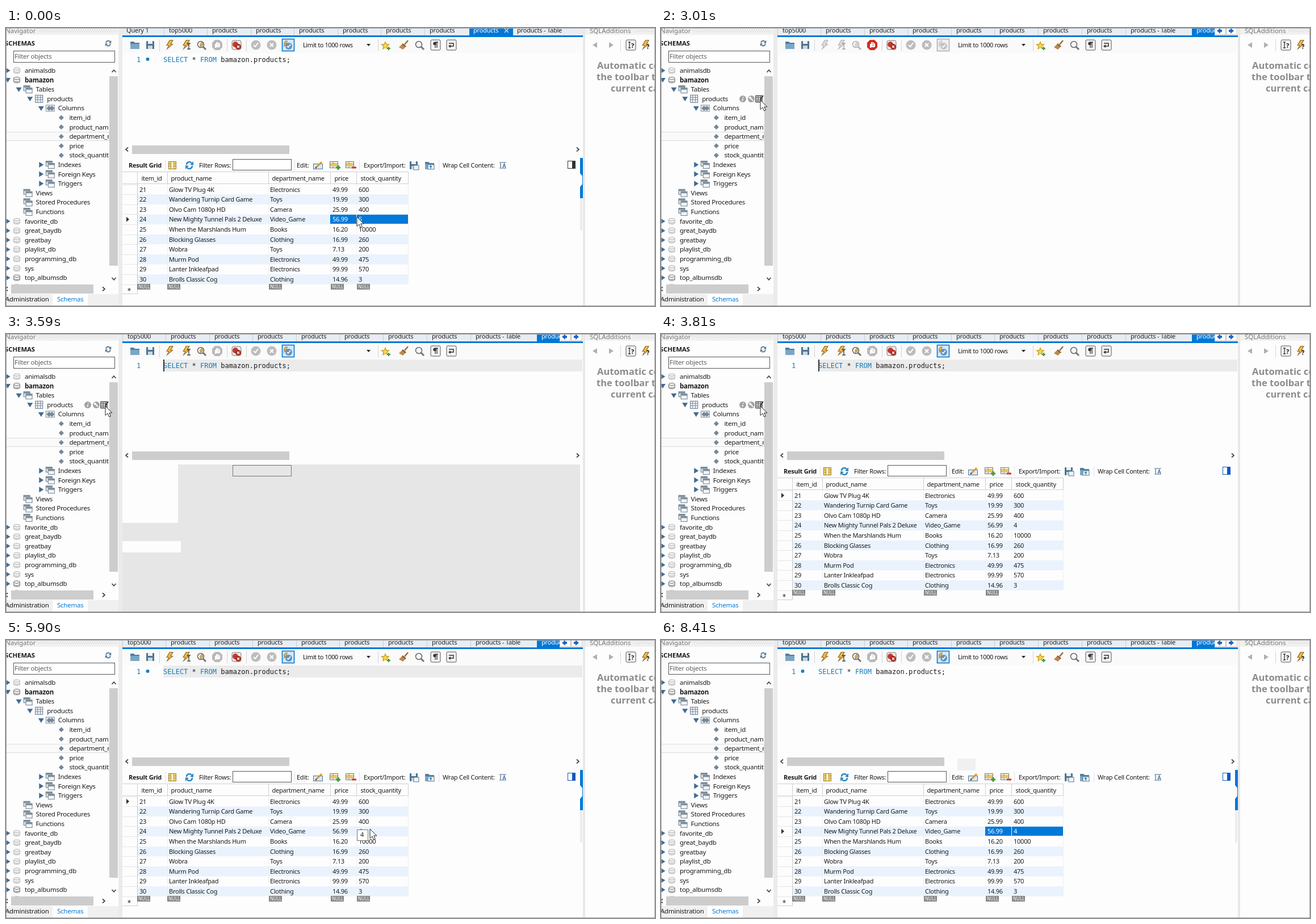
An HTML page for the animation above (9230 ms loop, 1143 by 490 pixels).

```html
<!DOCTYPE html>
<html lang="en">
<head>
<meta charset="utf-8">
<title>Query result refresh</title>
<style>
html, body { margin: 0; width: 100%; height: 100%; overflow: hidden; background: #fdfdfd; }
svg { display: block; width: 1143px; height: 490px; }
text { font: 11px "Noto Sans", "Open Sans", sans-serif; letter-spacing: -.25px; fill: #1a1a1a; white-space: pre; }
.tree { font-size: 11.5px; }
.tab { letter-spacing: -.2px; fill: #222; }
.bold { font-weight: 700; }
.title { font-size: 11.3px; font-weight: 700; letter-spacing: 0; }
.cap { font-size: 11.5px; letter-spacing: 0; fill: #777; }
.limit { letter-spacing: -.4px; }
.code { font: 12px "DejaVu Sans Mono", monospace; letter-spacing: 0; }
.kw { fill: #0f7fc0; }
.white { fill: #fff; }
.link { fill: #0078d7; }
.null { font-size: 8px; letter-spacing: 0; fill: #fff; }
.help { font-size: 16.5px; font-weight: 700; letter-spacing: 0; fill: #8c8c8c; }
.dim { filter: grayscale(1) opacity(.5); }
</style>
</head>
<body>
<svg id="stage" viewBox="0 0 1143 490"></svg>
<script>
const LOOP = 9230;
const BLUE = '#0078d7';

// Drawing helpers; text is placed by its vertical centre.
const text = (x, y, s, cls = '') => `<text x="${x}" y="${y + 4}" class="${cls}">${s}</text>`;
const rect = (x, y, w, h, fill, more = '') => `<rect x="${x}" y="${y}" width="${w}" height="${h}" fill="${fill}" ${more}/>`;
const box = (x, y, w, h, stroke, fill = 'none') => rect(x + .5, y + .5, w - 1, h - 1, fill, `stroke="${stroke}"`);
const path = (d, stroke, w = 1, fill = 'none') => `<path d="${d}" stroke="${stroke}" stroke-width="${w}" fill="${fill}"/>`;
const shape = (d, fill) => `<path d="${d}" fill="${fill}"/>`;
const disc = (x, y, r, fill) => `<circle cx="${x}" cy="${y}" r="${r}" fill="${fill}"/>`;
const at = (x, y, s) => `<g transform="translate(${x} ${y})">${s}</g>`;
const group = (id, s) => `<g id="${id}">${s}</g>`;
const vline = (x, y1, y2, c = '#d4d4d4') => rect(x, y1, 1, y2 - y1, c);
const list = (items, fn) => items.map(fn).join('');

// Small icons, centred on 0,0
const bolt = shape('M0-9H7L3-2H7L-6 9L-2 1H-6Z', '#8b6a35') + shape('M1-8H5L1-1H4L-3 5L0 0H-4Z', '#f8bd3e');
const lens = path('M3 3L8 8', '#777', 3) + `<circle r="5.5" cx="-1" cy="-1" fill="#f4f7fa" stroke="#666" stroke-width="1.5"/>`;
const disk = rect(-7, -7, 14, 14, '#4d7590', 'rx="1"') + rect(-4, -7, 8, 5, '#e9eff3') + rect(-4, 1, 8, 6, '#c7d7e0');
const folder = shape('M-8-6H-2L0-4H8V7H-8Z', '#4f7ea3') + rect(-8, -2, 16, 9, '#7ba6c6');
const button = s => rect(-8, -9, 17, 18, '#f4f4f4', 'rx="2" stroke="#555"') + s;
const refresh = path('M-5-1A5 5 0 0 1 4-4', '#3187c4', 2.5) + shape('M1-1L7-7V0Z', '#3187c4')
  + path('M5 1A5 5 0 0 1-4 4', '#3187c4', 2.5) + shape('M-1 1L-7 7V0Z', '#3187c4');
const gridIcon = (fill, line) => rect(-6.5, -6.5, 13, 13, fill, `stroke="${line}"`)
  + path('M-6.5-2.5H6.5M-6.5 1.5H6.5M-2.5-6.5V6.5M2.5-6.5V6.5', line, .8);
const db = c => rect(-5.5, -5, 11, 10, '#f1f1f1', `rx="3" stroke="${c}"`) + path('M-5.5-2Q0 1 5.5-2M-5.5 2Q0 5 5.5 2', c);
const stack = rect(-7.5, -6.5, 11, 9, '#dde3e8', 'stroke="#6f7f8c"') + rect(-7.5, -6.5, 11, 3, '#7d8d9a')
  + rect(-3.5, -2.5, 11, 9, '#f3f5f7', 'stroke="#6f7f8c"') + rect(-3.5, -2.5, 11, 3, '#7d8d9a');
const diamond = shape('M0-4.5L4.5 0L0 4.5L-4.5 0Z', '#76879a');
const columns = rect(-7.5, -5.5, 15, 11, '#e5e9ee', 'stroke="#8494a2"') + at(-2, 0, diamond) + at(3, 0, diamond);
const closed = shape('M-3.5-5L4.5 0L-3.5 5Z', '#416b93');
const open = shape('M-5-3.5H5L0 4.5Z', '#416b93');
const chevron = (x, y, turn) => `<path transform="translate(${x} ${y}) rotate(${turn})" d="M-3.5 2L0-2L3.5 2" fill="none" stroke="#444" stroke-width="1.7"/>`;
const rowsIcon = (mark, c) => rect(-8.5, -6.5, 14, 11, '#fff8dc', 'stroke="#777"') + path('M-8-3H5M-8 1H5M-3-6V4', '#8a8a8a')
  + rect(-8, -2, 13, 3, '#f2c94c') + path(mark, c, 3);
const dots = (x1, x2) => {
  let s = '';
  for (let x = x1; x < x2; x += 4) s += rect(x, 3, 1, 1, '#b5b5b5') + rect(x + 2, 6, 1, 1, '#b5b5b5');
  return s;
};

function navigator() {
  const items = [
    [0, 'animalsdb', 'db'], [0, 'bamazon', 'db', 1], [1, 'Tables', 'stack', 1], [2, 'products', 'grid', 1],
    [3, 'Columns', 'cols', 1], [4, 'item_id'], [4, 'product_name'], [4, 'department_name'], [4, 'price'],
    [4, 'stock_quantity'], [3, 'Indexes', 'stack', 0], [3, 'Foreign Keys', 'stack', 0], [3, 'Triggers', 'stack', 0],
    [1, 'Views', 'stack'], [1, 'Stored Procedures', 'stack'], [1, 'Functions', 'stack'],
    ...['favorite_db', 'great_baydb', 'greatbay', 'playlist_db', 'programming_db', 'sys', 'top_albumsdb'].map(n => [0, n, 'db']), [0, '', 'db']
  ];
  const icons = { stack, cols: columns, grid: gridIcon('#eef2f6', '#64788a') };
  const rows = list(items, ([depth, name, icon, isOpen], i) => {
    const y = 75 + i * 16.6, x = 33 + depth * 19.6;
    const strong = name === 'bamazon';
    const pic = icon === 'db' ? db(strong || i === 22 ? '#747474' : '#b4b4b4') : icons[icon] || diamond;
    const hasArrow = icon === 'db' || isOpen !== undefined;
    return (hasArrow ? at(x - 30, y, isOpen ? open : closed) : '') + at(x - 14, y, pic)
      + text(x, y, name, strong ? 'tree bold' : 'tree');
  });
  return rect(0, 0, 198, 12, '#f1f1f1') + text(-1, 5, 'Navigator', 'cap') + dots(56, 196)
    + text(-2, 27, 'SCHEMAS', 'title') + at(180, 27, `<g transform="scale(.75)">${refresh.replaceAll('#3187c4', '#587891')}</g>`)
    + box(13, 40, 179, 21, '#555', '#fff') + text(15, 50, 'Filter objects', 'tree" fill-opacity=".7')
    + box(-2, 183, 184, 16, '#dcdcdc', '#fafafa')
    + `<svg x="0" y="62" width="181" height="390" viewBox="0 62 181 390">${rows}</svg>`
    + rect(182, 85, 15, 334, '#cdcdcd') + chevron(190, 76, 0) + chevron(190, 442, 180)
    + rect(9, 452, 145, 16, '#cdcdcd') + chevron(1, 460, -90) + chevron(172, 460, 90)
    + rect(0, 469, 198, 21, '#f0f0f0') + rect(82, 469, 62, 21, '#fff')
    + text(-1, 478, 'Administration', 'tree') + text(90, 478, 'Schemas', 'tree link');
}

function tabs() {
  const bar = rect(205, 0, 811, 13, '#e7edf4');
  const tab = (x, s) => vline(x - 9, 0, 13, '#c5cfd9') + text(x, 4, s, 'tab');
  const run = (x, n) => list([...Array(n).keys()], i => tab(Math.round(x + i * 76.6), 'products'));
  const before = bar + tab(212, 'Query 1') + tab(287, 'top5000') + run(363, 6)
    + rect(816, 0, 77, 14, BLUE) + text(823, 4, 'products', 'tab white') + path('M878 1L885 8M885 1L878 8', '#cfe4f7', 1.3)
    + text(900, 4, 'products - Table', 'tab');
  const after = bar + tab(214, 'top5000') + run(290, 7) + tab(827, 'products - Table')
    + rect(935, 0, 41, 14, BLUE) + text(943, 4, 'products', 'tab white') + rect(975, 0, 41, 13, '#fff')
    + box(975, -1, 20, 13, '#b9c4cf') + box(995, -1, 20, 13, '#b9c4cf')
    + shape('M979 5L985 0V3H988V7H985V10Z', '#1767c9') + shape('M1009 5L1003 0V3H1000V7H1003V10Z', '#1767c9');
  return group('tabsBefore', before) + group('tabsAfter', after) + rect(205, 13, 811, 3, BLUE);
}

function toolbar() {
  const y = 30;
  const star = shape('M0-8L2.3-2.8L8-2.4L3.6 1.3L5 7L0 4L-5 7L-3.6 1.3L-8-2.4L-2.3-2.8Z', '#c79a18') + shape('M0-5L1.5-1.5L5-1L2 1L3 5L0 3L-3 5L-2 1L-5-1L-1.5-1.5Z', '#ffd84a');
  const broom = path('M7-8L1-1', '#9b6a3b', 2.5) + shape('M-2-3L4 2L-2 8L-9 4Z', '#b9894f') + path('M-3-2L3 3', '#6f4b28', 1.5);
  return rect(205, 16, 811, 28, '#fafafa')
    + list([270, 389, 423, 655], x => vline(x, 20, 41))
    + at(227, y, folder) + at(254, y, disk)
    + group('run', at(288, y, bolt) + at(317, y, bolt + path('M2-3H8M5-3V7M2 7H8', '#444', 1.4)) + at(344, y, lens + `<g transform="scale(.55)">${bolt}</g>`))
    + at(372, y, `<path id="stop" d="M-4-9H4L9-4V4L4 9H-4L-9 4V-4Z"/>` + path('M-3 5V-2M-1 2V-5M1.5 2V-5M4 3V-3M-3 3H4', '#fff', 2))
    + at(406, y, rect(-8, -8, 16, 16, '#ececec', 'rx="3" stroke="#777"') + disc(-2, -1, 5, '#c8372d') + disc(3, 3, 5, '#a72820') + path('M1 1L5 5M5 1L1 5', '#fff', 1.3))
    + at(440, y, disc(0, 0, 8.5, '#bcbcbc') + path('M-4 0L-1 3L4-4', '#fff', 2))
    + at(468, y, disc(0, 0, 8.5, '#bcbcbc') + path('M-3-3L3 3M3-3L-3 3', '#fff', 2))
    + group('toggle', rect(486.5, 19.5, 21, 21, '#d3e8fa', `stroke="${BLUE}" stroke-width="1.6"`)
      + at(496, y, disc(2, 2, 6, '#6d91b0') + path('M-1 2L1 4L5-1', '#fff', 1.6) + `<g transform="translate(-4 -2) scale(.6)">${bolt}</g>`))
    + group('limit', text(523, y, 'Limit to 1000 rows', 'limit'))
    + shape('M635 28H642L638.5 32Z', '#222')
    + at(668, y + 1, star + path('M3 5H9M6 2V8', '#3d9a37', 2)) + at(701, y, broom) + at(728, y, lens)
    + at(756, y, button(path('M0-5V5M3-5V5M5-5H-1', '#333', 1.3) + disc(-1, -2.5, 2.7, '#333')))
    + at(784, y, button(path('M-4-3H4V2H-2', '#333', 1.5) + shape('M-5 2L-1-1V5Z', '#333')));
}

function editor() {
  const sql = `<text x="277" y="60" class="code"><tspan class="kw">SELECT</tspan> * <tspan class="kw">FROM</tspan> bamazon.products;</text>`;
  return group('current', rect(277, 45, 738, 21, '#ebebeb'))
    + group('sql', text(230, 56, '1', 'code kw') + sql)
    + group('dot', disc(249.5, 55, 3, '#1680c7'))
    + group('caret', rect(277, 45, 2, 21, '#333'))
    + group('split', chevron(213, 214, -90) + chevron(1007, 214, 90) + rect(222, 207, 277, 15, '#cdcdcd'));
}

const rowY = i => 284.5 + i * 17.6;
const cellX = [235, 287, 465, 575, 621];
const edges = [231, 284, 462, 571, 617, 708];

function results() {
  const data = [
    ['Glow TV Plug 4K', 'Electronics', '49.99', '600'],
    ['Wandering Turnip Card Game', 'Toys', '19.99', '300'],
    ['Olvo Cam 1080p HD', 'Camera', '25.99', '400'],
    ['New Mighty Tunnel Pals 2 Deluxe', 'Video_Game', '56.99', ''],
    ['When the Marshlands Hum', 'Books', '16.20', '10000'],
    ['Blocking Glasses', 'Clothing', '16.99', '260'],
    ['Wobra', 'Toys', '7.13', '200'],
    ['Murm Pod', 'Electronics', '49.99', '475'],
    ['Lanter Inkleafpad', 'Electronics', '99.99', '570'],
    ['Brolls Classic Cog', 'Clothing', '14.96', '3']
  ];
  const heads = ['item_id', 'product_name', 'department_name', 'price', 'stock_quantity'];
  const nullTag = i => rect(edges[i] + (i > 1 ? 1 : 0), 451, 23, 10, '#858585') + text(edges[i] + (i > 1 ? 3 : 2), 455, 'NULL', 'null');
  const bar = text(216, 242, 'Result Grid', 'bold') + at(293, 242, gridIcon('#f7d87a', '#9b7b2c') + rect(-2, -6, 4, 12, '#fff3c4'))
    + at(323, 242, refresh) + text(340, 242, 'Filter Rows:') + box(399, 231, 104, 20, '#555', '#fff')
    + text(512, 242, 'Edit:')
    + at(550, 242, rect(-8.5, -2.5, 16, 9, '#dbe8f2', 'stroke="#4d7590"') + path('M-3 3L6-6', '#d69a35', 3) + path('M-5 5L-3 3', '#333', 2))
    + at(579, 242, rowsIcon('M2 4H10M6 0V8', '#3d9a37')) + at(607, 242, rowsIcon('M2 4H10', '#c8372d'))
    + text(630, 242, 'Export/Import:')
    + at(718, 242, disk + rect(0, 0, 9, 8, '#eef4f8', 'stroke="#56778d"'))
    + at(746, 242, folder + rect(-3, -1, 11, 8, '#eef4f8', 'stroke="#56778d"') + path('M2 6V1M0 3L2 1L4 3', '#2b7fb8', 1.3))
    + text(769, 242, 'Wrap Cell Content:')
    + at(875, 242, path('M-6-5H6M-6 5H6M-4-4V4M0 4L2.5-3L5 4M1 2H4', '#416b93', 1.2))
    + list([280, 508, 622, 762], x => vline(x, 233, 251, '#e2e2e2'))
    + `<g id="panel">${rect(989.5, 234.5, 13, 13, '#fff', 'stroke="currentColor"')}${rect(997, 235, 6, 13, 'currentColor')}</g>`;
  const body = list(data, (row, i) => (i % 2 ? rect(231, rowY(i) - 8.8, 477, 17.6, '#eaf3fd') : '')
    + list([String(21 + i), ...row], (s, c) => text(cellX[c], rowY(i), s)));
  const sideLines = list([...Array(11).keys()], i => rect(205, Math.round(rowY(i) - 9), 26, 1, '#e6e6e6'));
  return group('results', bar + rect(205, 253, 504, 1, '#cfcfcf')
    + body + sideLines
    + list(edges, x => vline(x, 254, 275, '#d0d0d0')) + list(edges.slice(1), x => vline(x, 275, 450, '#f0f0f0'))
    + vline(231, 275, 469, '#c8c8c8') + rect(205, 274, 504, 1, '#d0d0d0') + rect(205, 468, 27, 1, '#d0d0d0')
    + list(heads, (s, i) => text(cellX[i] + 3.5, 265, s))
    + list([0, 1, 2, 3], nullTag) + group('lastNull', nullTag(4))
    + path('M217 458V464M214.5 459.5L219.5 462.5M219.5 459.5L214.5 462.5', '#444')
    + `<path id="marker" d="M212-4.5L217 0L212 4.5Z" fill="#333"/>`
    + group('pickPrice', rect(571, 329, 46, 16, BLUE) + text(575, 337, '56.99', 'white'))
    + group('pickStock', rect(618, 329, 90, 16, BLUE))
    + `<text id="stock" x="621" y="341"></text>`);
}

const loading = () => group('loading', rect(205, 230, 806, 260, '#e6e6e6') + rect(205, 230, 98, 103, '#fdfdfd')
  + rect(205, 365, 103, 20, '#fdfdfd') + box(399, 231, 104, 20, '#777'));

const strip = () => group('strip', rect(1011, 300, 4, 57, '#ececec')
  + shape('M1011 229H1016V262L1011 256ZM1011 280L1016 274V300H1011Z', BLUE) + vline(1015, 256, 280, BLUE));

function additions() {
  return rect(198, 0, 7, 490, '#ebebeb') + rect(1016, 0, 4, 490, '#e8e8e8') + rect(1020, 0, 123, 12, '#f1f1f1')
    + text(1028, 5, 'SQLAdditions', 'cap') + dots(1105, 1140)
    + shape('M1041 25V35L1033 30Z', '#b0b0b0') + shape('M1062 25V35L1070 30Z', '#b0b0b0') + vline(1082, 20, 41)
    + at(1100, 30, button(path('M-4-5H0M-2-5V5M-4 5H0', '#333', 1.3)) + text(1, 1, '?', 'bold'))
    + at(1126, 30, bolt) + text(1128, 33, '?', 'bold')
    + text(1041, 68, 'Automatic context', 'help') + text(1040, 88, 'the toolbar to', 'help') + text(1065, 108, 'current caret', 'help');
}

function rowTools() {
  const wrench = disc(0, 0, 6, 'currentColor') + path('M-3-3L3 3', '#fff', 2) + disc(-2, -2, 2, '#fff');
  const info = disc(0, 0, 6, 'currentColor') + path('M1-3.5L.6-2M.3-.5L-.8 3.5', '#fff', 1.6);
  const table = rect(-6, -5.5, 11, 11, '#fff', 'stroke="currentColor" stroke-width="1.3"')
    + path('M-6-2H5M-6 2H5M-2-5V5M2-5V5', 'currentColor') + path('M2 1L7-6', 'currentColor', 2);
  return group('tools', list([[144, info], [159, wrench], [173, table]], ([x, s]) => `<g class="tool">${at(x, 125, s)}</g>`));
}

const $ = id => document.getElementById(id);
$('stage').innerHTML = rect(0, 0, 1143, 490, '#fdfdfd') + navigator() + tabs() + toolbar() + editor() + results() + loading()
  + strip() + additions() + rowTools()
  + group('scrap', rect(522, 209, 32, 21, '#f0f0f0'))
  + group('tip', box(618, 334, 20, 20, '#777', '#fff') + text(624, 343, '4'))
  + box(0, 0, 1143, 490, '#a6a6a6')
  + group('cursor', path('M0 0V16.5L4 13L6.6 19L9.4 17.8L6.8 12H12Z', '#222', 1, '#fff'));

// Pointer stops: time, x, y
const stops = [
  [0, 618, 333], [830, 488, 312],
  [1120, 405, 282], [1260, 300, 235], [1400, 215, 188], [1540, 165, 150], [1690, 142, 130], [1840, 140, 124], [1980, 146, 123], [2110, 154, 123],
  [2260, 162, 125], [2380, 170, 127], [2500, 175, 127],
  [4420, 230, 160], [4560, 330, 215], [4720, 430, 262], [4870, 520, 300], [5030, 580, 322], [5200, 612, 332], [5360, 622, 335],
  [5490, 632, 334], [5620, 638, 333], [5900, 641, 333], [6030, 632, 334], [6200, 624, 334], [6350, 606, 333], [6490, 592, 332],
  [7140, 660, 362], [7290, 745, 405], [7430, 786, 424],
  [8000, 700, 360], [8140, 610, 282], [8270, 540, 222]
];
const toolEls = document.querySelectorAll('.tool');
const show = (id, yes) => { $(id).style.display = yes ? '' : 'none'; };

function render(t) {
  const within = (a, b) => t >= a && t < b;
  const fresh = t >= 3010, busy = within(3010, 3590), picked = !fresh || t >= 6350;
  const stockPicked = !fresh || t >= 6200;
  show('tabsBefore', !fresh);
  show('tabsAfter', fresh);
  for (const id of ['run', 'toggle']) $(id).setAttribute('class', busy ? 'dim' : '');
  $('stop').setAttribute('fill', busy ? '#d32a1e' : '#b9b9b9');
  show('limit', !within(3590, 3810));
  show('sql', !within(3010, 3150));
  show('current', within(3290, 6200));
  show('caret', within(3290, 4870));
  show('dot', !within(3010, 4130));
  show('split', !busy);
  show('results', !within(3010, 3810));
  show('loading', within(3590, 3810));
  show('strip', !within(3010, 3960));
  show('lastNull', !within(3010, 3960));
  show('pickPrice', picked);
  show('pickStock', stockPicked);
  $('stock').textContent = fresh ? 4 : 5;
  $('stock').style.fill = stockPicked ? '#fff' : '#1a1a1a';
  $('marker').setAttribute('transform', `translate(0 ${rowY(stockPicked ? 3 : 0)})`);
  $('panel').style.color = fresh ? '#1258c4' : '#333';
  show('tools', within(1690, 4420));
  const lit = t < 2110 ? 0 : t < 2380 ? 1 : 2;
  toolEls.forEach((el, i) => { el.style.color = i === lit ? '#333' : '#a2a2a2'; });
  show('tip', within(5360, 6030));
  show('scrap', t >= 8410);
  show('cursor', t < 8410);
  const [, x, y] = stops.findLast(s => s[0] <= t);
  $('cursor').setAttribute('transform', `translate(${x} ${y})`);
}

const start = performance.now();
function frame() {
  render((performance.now() - start) % LOOP);
  requestAnimationFrame(frame);
}
frame();
</script>
</body>
</html>
```
